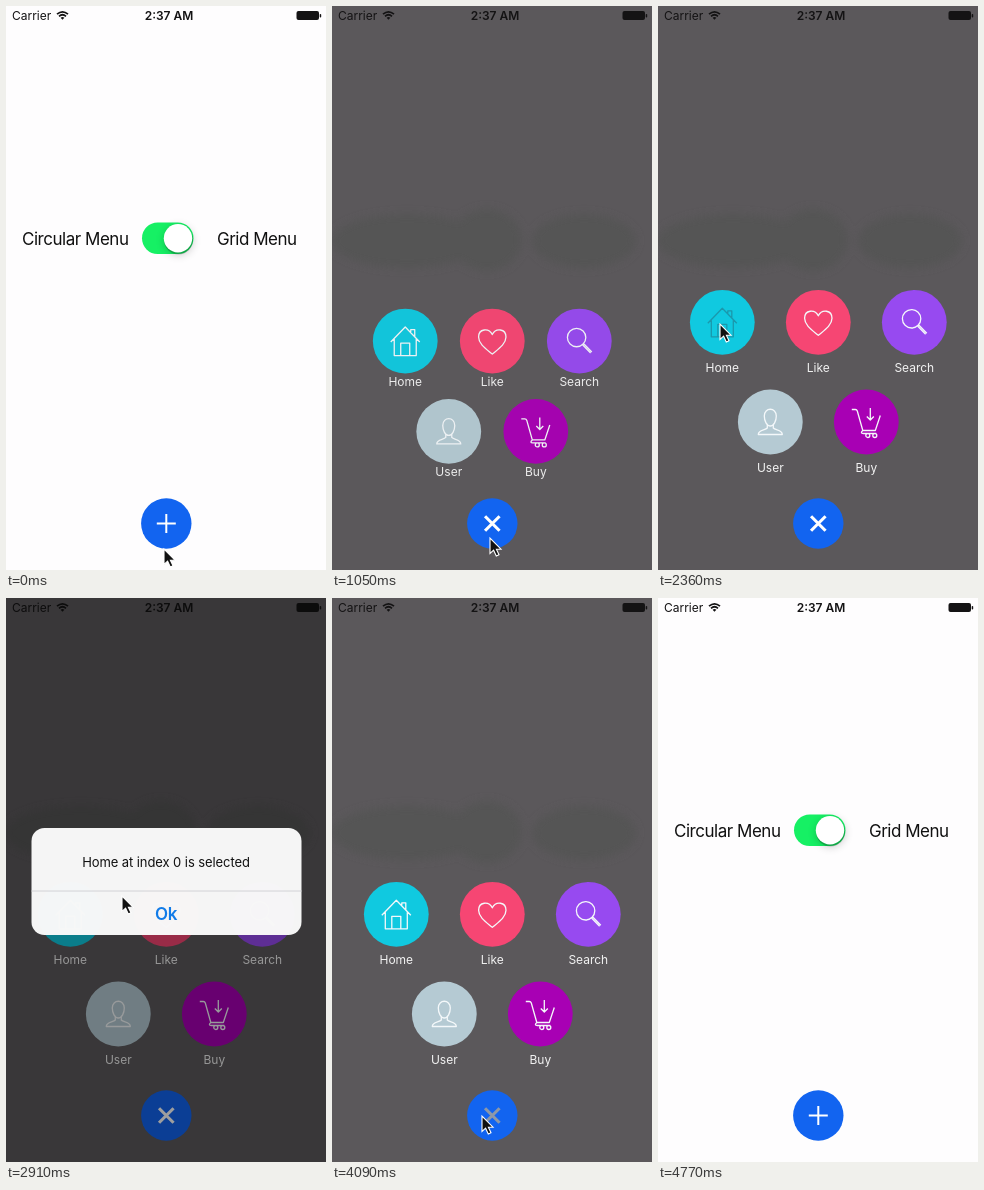
These frames come from a looping animation (320x564 px, 4810 ms). An HTML page:

```html
<!DOCTYPE html>
<html lang="en">
<head>
<meta charset="utf-8">
<title>Grid menu</title>
<style>
html, body { margin: 0; width: 100%; height: 100%; overflow: hidden; background: #fff; }
svg { display: block; width: 100%; height: 100%; }
text { font-family: Inter, sans-serif; font-size: 12px; }
.big { font-size: 17px; letter-spacing: -.47px; }
.mid { text-anchor: middle; }
.icon { fill: none; stroke: #f4f8fa; stroke-width: 1.3; stroke-linejoin: round; }
</style>
</head>
<body>
<svg viewBox="0 0 320 564">
  <defs><filter id="blur" x="-30%" y="-60%" width="160%" height="220%"><feGaussianBlur stdDeviation="4"/></filter></defs>
  <rect width="320" height="564" fill="#fefdfe"/>
  <g fill="#111">
    <text class="big" x="16" y="239">Circular Menu</text>
    <text class="big" x="211" y="239">Grid Menu</text>
  </g>
  <rect x="136" y="216.500" width="51.500" height="31.500" rx="15.700" fill="#16f064"/>
  <circle cx="172.500" cy="234.500" r="14.500" opacity=".2" filter="url(#blur)"/>
  <circle cx="172.500" cy="234" r="14.500" opacity=".2"/>
  <circle cx="172" cy="232.200" r="14.200" fill="#fff"/>

  <g id="shade">
    <rect width="320" height="564" fill="#5b585b"/>
    <g fill="#555555" filter="url(#blur)">
      <ellipse cx="75" cy="235" rx="76" ry="27"/>
      <ellipse cx="155" cy="234" rx="35" ry="31"/>
      <ellipse cx="252" cy="235" rx="52" ry="27"/>
    </g>
  </g>

  <g fill="#141314">
    <text x="6" y="14">Carrier</text>
    <text class="mid" x="163" y="14" font-weight="600">2:37 AM</text>
    <path d="M51 8.200Q56.500 3.400 62 8.200M53 10.300Q56.500 7.200 60 10.300" fill="none" stroke="#141314" stroke-width="1.700"/>
    <path d="M54.600 11.700Q56.500 10.200 58.400 11.700L56.500 13.700Z"/>
    <rect x="290.500" y="5" width="22.500" height="9" rx="2"/>
    <rect x="313.700" y="8" width="1.500" height="3.500" rx=".7"/>
  </g>

  <g id="items"></g>

  <g transform="translate(160.300 517.500)">
    <circle r="25.200" fill="#1264f0"/>
    <path id="plus" d="M-9.500 0H9.500M0-9.500V9.500" stroke="#fff"/>
  </g>

  <rect id="dim" width="320" height="564"/>
  <g id="alert">
    <rect x="25.500" y="230" width="270" height="107" rx="13" fill="#f9f9f9" fill-opacity=".98"/>
    <path d="M25.500 293H295.500" stroke="#d2d2d6"/>
    <text class="mid" x="160" y="269" style="font-size:13px;letter-spacing:-.08px" fill="#111">Home at index 0 is selected</text>
    <text class="mid big" x="160" y="321.500" font-weight="600" fill="#117be8">Ok</text>
  </g>
  <path id="cursor" d="M0 0V15.500L3.600 12.200L6.300 18L9 16.800L6.400 11.200H11Z" fill="#111" stroke="#fff" stroke-width="1.100"/>
</svg>
<script>
const LOOP = 4810;
const $ = id => document.getElementById(id);
const clamp = v => Math.max(0, Math.min(1, v));
const ease = u => u < .5 ? 2 * u * u : 1 - 2 * (1 - u) ** 2;
const ramp = (t, start, length) => ease(clamp((t - start) / length));
const fade = (id, v) => $(id).setAttribute('opacity', v);

// label, x, y, colour, icon
const menu = [
  ['Home', 64.3, 316.3, '#10c9e0', 'M-14.500 1L0-14L14.500 1M-11-2V14.500H11V-2M-4.500 14.500V2H4.500V14.500M5.500-8V-11.500H9.500V-4.500'],
  ['Like', 160.3, 316.3, '#f64673', 'M0 13C-6 8-13.700 3-13.700-4C-13.700-12.500-3.500-13.500 0-6.500C3.500-13.500 13.700-12.500 13.700-4C13.700 3 6 8 0 13Z'],
  ['Search', 256.3, 316.3, '#974af0', 'M6.500-3.500A9.200 9.200 0 1 1-11.900-3.500A9.200 9.200 0 1 1 6.500-3.500M3.500 4L11.300 12M4.700 3L12.500 11'],
  ['User', 112.3, 416, '#b5cad3', 'M-6-6C-6-15 6-15 6-6C6-1 3.500 4 0 4C-3.500 4-6-1-6-6ZM-3 3V6C-5 8.500-12 7.500-12 12.500H12C12 7.500 5 8.500 3 6V3'],
  ['Buy', 208.3, 416, '#a800b4', 'M-14.500-12.500H-11Q-9.500-12.500-9-11L-3.500 8.500H9L14-6.500M-3.500 8.500Q-6.500 11.500-3 11.500H10M3.500 13.500a2 2 0 1 1-4 0a2 2 0 1 1 4 0M10.500 13.500a2 2 0 1 1-4 0a2 2 0 1 1 4 0M4-14V-2M.5-5.500L4-2L7.500-5.500']
];
$('items').innerHTML = menu.map(([label, , , color, icon]) =>
  `<g><circle r="32.400" fill="${color}"/><path class="icon" d="${icon}"/><text class="mid" fill="#f2f2f2">${label}</text></g>`).join('');
const items = [...$('items').children];

// time, x, y of the pointer tip
const pointer = [
  [0, 158, 543], [50, 158, 543], [500, 158, 532], [1400, 158, 532], [2200, 62, 318],
  [2480, 62, 318], [2860, 116, 298], [3420, 116, 298], [3980, 150, 518],
  [4280, 150, 518], [4650, 150, 570], [LOOP, 150, 570]
];

function pointerAt(t) {
  const i = pointer.findIndex(k => k[0] > t);
  const [t0, x0, y0] = pointer[i - 1], [t1, x1, y1] = pointer[i];
  const u = ramp(t, t0, t1 - t0);
  return [x0 + (x1 - x0) * u, y0 + (y1 - y0) * u];
}

function draw(t) {
  const open = ramp(t, 750, 384) - ramp(t, 4210, 384);
  const turn = ramp(t, 750, 290) - ramp(t, 4210, 290);
  const shade = ramp(t, 750, 290) - ramp(t, 4230, 360);
  fade('shade', shade);
  fade('items', ramp(t, 750, 350) - ramp(t, 4210, 384));

  items.forEach((item, i) => {
    const [, x, y] = menu[i];
    item.setAttribute('transform', `translate(${160 + (x - 160) * open} ${517 + (y - 517) * open})`);
    item.lastChild.setAttribute('y', 54 * open - 4);
  });
  const pressed = t > 2300 && t < 2460;
  items[0].children[1].style.stroke = pressed ? '#1b98ac' : '';

  $('plus').setAttribute('transform', `rotate(${45 * turn}) scale(${1 + .08 * turn})`);
  $('plus').setAttribute('stroke-width', 2 + .9 * turn);
  $('plus').setAttribute('stroke', t > 4040 && t < 4200 ? '#8d98a8' : '#fff');

  const shown = ramp(t, 2470, 360), alert = shown - ramp(t, 3200, 340);
  fade('dim', .38 * alert);
  fade('alert', alert);
  const size = 1.15 - .15 * shown;
  $('alert').setAttribute('transform', `translate(160 283.500) scale(${size}) translate(-160 -283.500)`);
  $('cursor').setAttribute('transform', `translate(${pointerAt(t)})`);
}

function tick() {
  draw(performance.now() % LOOP);
  requestAnimationFrame(tick);
}
tick();
</script>
</body>
</html>
```
